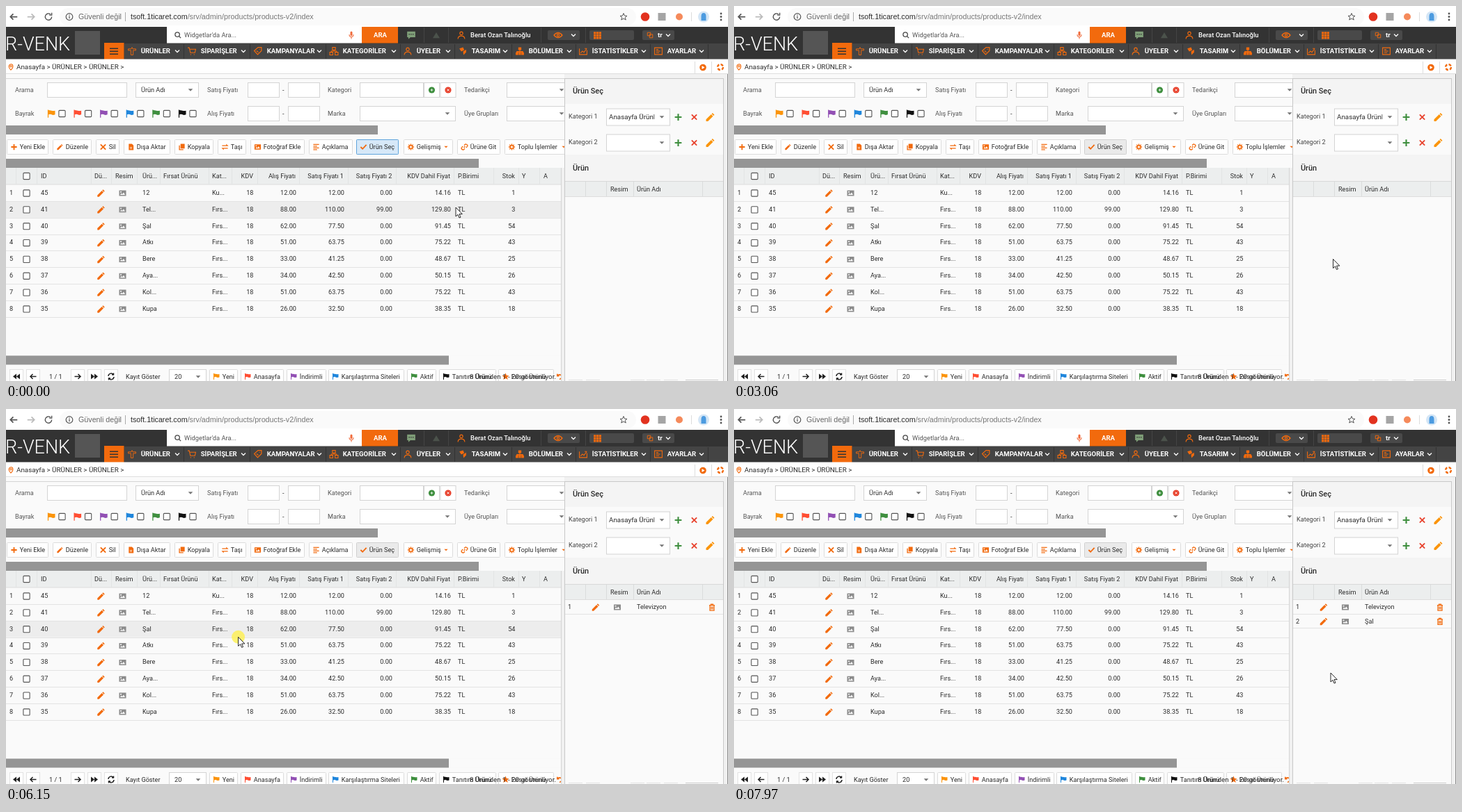
An HTML page for the animation above (8000 ms loop, 1037 by 540 pixels).

```html
<!DOCTYPE html>
<html lang="tr">
<head>
<meta charset="utf-8">
<title>Ürün Seç</title>
<style>
html, body { margin: 0; width: 100%; height: 100%; overflow: hidden; background: #fafafa; }
svg { display: block; width: 1037px; height: 540px; }
text { font-family: Roboto, "Noto Sans", sans-serif; white-space: pre; }
text.url { font-family: "Liberation Sans", Arial, sans-serif; }
</style>
</head>
<body>
<svg id="stage" viewBox="0 0 1037 540"></svg>
<script>
const stage = document.getElementById('stage');
const ORANGE = '#f26a0d', GREEN = '#3f8f3f', RED = '#e8432e', INK = '#2b2b2b', LINE = '#d4d4d4';
const PURPLE = '#9250b4', BLUE = '#1f86dc', AMBER = '#fb940b';
let layer = stage;

function el(tag, attrs, parent = layer) {
  const node = document.createElementNS('http://www.w3.org/2000/svg', tag);
  for (const key in attrs) node.setAttribute(key, attrs[key]);
  return parent.appendChild(node);
}
const rect = (x, y, w, h, fill, more) => el('rect', { x, y, width: w, height: h, fill, ...more });
const box = (x, y, w, h, fill = '#fff', stroke = LINE, rx = 0) =>
  rect(x + .5, y + .5, w - 1, h - 1, fill, { stroke, rx });
const disc = (cx, cy, r, fill, more) => el('circle', { cx, cy, r, fill, ...more });

// Text is placed by the vertical centre of its capitals.
function text(x, cy, str, more = {}) {
  const size = more['font-size'] || 9.13;
  const node = el('text', { x, y: cy + size * .355, fill: INK, 'font-size': size, ...more });
  node.textContent = str;
  return node;
}
const right = (x, cy, str) => text(x, cy, str, { 'text-anchor': 'end' });

// Icons on a 24 unit grid: [path, stroke width], 0 means filled.
const ICONS = {
  pencil: ['M3 17V21H7L18 10L14 6ZM15 5L19 9L21 7L17 3Z', 0],
  picture: ['M2 4H22V20H2ZM5 17H19L15 10L11 15L8 12ZM5 7V10H9V7Z', 0],
  flag: ['M3 3V21H5V14Q9 12 12 14T20 14V5Q16 6 12 5T5 4V3Z', 0],
  check: ['M3 12L9 18L21 5', 4],
  plus: ['M12 3V21M3 12H21', 4],
  cross: ['M4 4L20 20M20 4L4 20', 4],
  sheet: ['M5 2H15L20 7V22H5ZM9 11L15 18H12L9 14ZM15 11L9 18H12L15 14Z', 0],
  copy: ['M8 2H21V17H8ZM3 7H6V19H17V22H3Z', 0],
  swap: ['M3 8H20L16 4M21 16H4L8 20', 2.6],
  lines: ['M3 4H21M3 9.5H15M3 15H21M3 20.5H15', 2.6],
  gear: ['M12 2V6M12 18V22M2 12H6M18 12H22M5 5L8 8M16 16L19 19M5 19L8 16M16 8L19 5M7 12A5 5 0 1 0 17 12A5 5 0 1 0 7 12', 3.2],
  link: ['M10 14L14 10M11 7L15 3Q19 3 21 6T20 11L17 14M13 17L9 21Q5 21 3 18T4 13L7 10', 3],
  down: ['M4 8H20L12 16Z', 0],
  chevron: ['M4 8L12 16L20 8', 3.4],
  left: ['M21 12H4M11 5L4 12L11 19', 3],
  rightArrow: ['M3 12H20M13 5L20 12L13 19', 3],
  first: ['M12 4V20L2 12ZM22 4V20L12 12Z', 0],
  last: ['M12 4V20L22 12ZM2 4V20L12 12Z', 0],
  reload: ['M20 12A8 8 0 1 1 17 5.8M20 2V8H14', 2.4],
  sync: ['M4 11A8 8 0 0 1 18 6M20 13A8 8 0 0 1 6 18M19 2V7H14M5 22V17H10', 3],
  undo: ['M5 4V10H11M5 10Q12 3 18 9T12 21', 3.5],
  star: ['M12 2L15 9L22 9.5L16.5 14L18.5 21L12 17L5.5 21L7.5 14L2 9.5L9 9Z', 0],
  person: ['M8 7A4 4 0 1 0 16 7A4 4 0 1 0 8 7M3 22Q3 14 12 14T21 22', 2],
  pin: ['M12 22Q4 13 5 8T12 2T19 8T12 22ZM9 9A3 3 0 1 0 15 9A3 3 0 1 0 9 9', 2.5],
  trash: ['M4 6H20M9 5V3H15V5M6 7V21H18V7M10 10V18M14 10V18', 2.6],
  search: ['M15 15L21 21M3 10A7 7 0 1 0 17 10A7 7 0 1 0 3 10', 2.8],
  mic: ['M9 4Q9 1 12 1T15 4V11Q15 14 12 14T9 11ZM5 10Q5 18 12 18T19 10H17Q17 16 12 16T7 10ZM11 18H13V23H11Z', 0],
  chat: ['M2 3H22V17H10L5 22V17H2Z', 0],
  warn: ['M12 3L23 21H1Z', 0],
  eye: ['M1 12Q12 -1 23 12Q12 25 1 12ZM9 12A3 3 0 1 0 15 12A3 3 0 1 0 9 12', 2.4],
  grid: ['M2 3H8V9H2ZM9 3H15V9H9ZM16 3H22V9H16ZM2 10H8V15H2ZM9 10H15V15H9ZM16 10H22V15H16ZM2 16H8V22H2ZM9 16H15V22H9ZM16 16H22V22H16Z', 0],
  lang: ['M2 2H14V14H2ZM10 9H22V22H10Z', 2.5],
  box: ['M12 2L14 6H22V10H15V22H9V10H2V6H10Z', 1.7],
  cart: ['M1 3H5L8 16H20L22 7H6M9 20V22M18 20V22', 2],
  tag: ['M2 11L12 2H21V11L11 21ZM16 6V8M8 11L13 15', 2.2],
  tree: ['M8 2H16V9H8ZM1 15H9V22H1ZM15 15H23V22H15ZM12 9V12M5 15V12H19V15', 2],
  brush: ['M3 5L13 2L16 9L8 13ZM13 13L21 8V15L14 22Z', 0],
  blocks: ['M8 2H16V9H8ZM1 15H8V22H1ZM9 15H15V22H9ZM16 15H23V22H16ZM11 9H13V12H21V15H3V12H11Z', 0],
  chart: ['M2 5V21H22V9M5 17L10 12L14 15L21 6M16 5H22', 2],
  list: ['M2 3H22V21H2ZM6 8H12M6 12H17M6 16H14', 2]
};
function icon(name, cx, cy, size, color) {
  const [d, width] = ICONS[name], k = size / 24;
  return el('path', {
    d, transform: `translate(${cx - size / 2} ${cy - size / 2}) scale(${k})`,
    fill: width ? 'none' : color, 'fill-rule': 'evenodd',
    stroke: width ? color : 'none', 'stroke-width': width
  });
}
const checkbox = (cx, cy) => rect(cx - 4.6, cy - 4.6, 9.2, 9.2, '#fff', { stroke: '#555', 'stroke-width': 1.1, rx: 1 });
function select(x, y, w, h, label) {
  box(x, y, w, h);
  if (label) text(x + 8, y + h / 2, label);
  icon('down', x + w - 12, y + h / 2, 10, '#777');
}
const group = () => layer = el('g', {}, stage);

function browserBar() {
  rect(0, 0, 1037, 30, '#fff');
  rect(77, 3, 828, 25, '#fafafa', { rx: 12.5 });
  icon('left', 11, 15.5, 14, '#555');
  icon('rightArrow', 36, 15.5, 14, '#bbb');
  icon('reload', 61, 15.5, 14, '#555');
  disc(91, 15.5, 4.8, 'none', { stroke: '#555', 'stroke-width': 1.2 });
  rect(90.4, 14.5, 1.2, 3.6, '#555');
  rect(90.4, 12.4, 1.2, 1.2, '#555');
  const url = { class: 'url', 'font-size': 10.73 };
  text(104, 15.5, 'Güvenli değil', { ...url, fill: '#666' });
  rect(171, 9, 1, 13, '#aaa');
  const address = text(179, 15.5, 'tsoft.1ticaret.com', url);
  el('tspan', { fill: '#777' }, address).textContent = '/srv/admin/products/products-v2/index';
  el('path', { d: ICONS.star[0], transform: 'translate(881 9.5) scale(.5)', fill: 'none', stroke: '#555', 'stroke-width': 2 });
  disc(918, 15.5, 6.3, '#e2321f');
  rect(936.5, 10, 11, 11, '#a5a5a5');
  disc(967, 15.5, 5, '#f58a5b');
  rect(984, 9, 1, 13, '#ddd');
  disc(1002, 15.5, 8, '#d4e6f6');
  el('path', { d: 'M998.5 21V15Q998.5 10 1002 10T1005.5 15V21Z', fill: '#4c9be0' });
  for (const y of [11, 15.5, 20]) disc(1027, y, 1.4, '#555');
}

function topBar() {
  rect(0, 30, 1037, 47, '#333');
  rect(170, 54, 867, 22.5, '#444');
  text(-1, 54, 'R-VENK', { 'font-size': 27, 'font-weight': 300, fill: '#fff' });
  rect(99, 36, 36, 34, '#555');
  rect(141, 53, 28.5, 24, ORANGE);
  for (const y of [61, 65, 69]) rect(149, y - .5, 12, 1.5, '#333');
  rect(231, 30, 280, 23.5, '#fff');
  icon('search', 247, 42, 11, '#444');
  text(256, 42, "Widgetlar'da Ara...", { 'font-size': 9.3, fill: '#555' });
  icon('mic', 496, 42, 12, '#f06a3a');
  rect(511, 30, 52, 23.5, ORANGE);
  const bold = { 'font-size': 9.6, 'font-weight': 700, fill: '#fff' };
  text(528, 42, 'ARA', bold);
  for (const x of [600, 635, 768, 832]) rect(x, 31, 1, 22, '#444');
  icon('chat', 582, 42, 14, '#7f9f78');
  for (const x of [578.5, 581.2, 584]) rect(x, 40, 1.4, 1.4, '#333');
  icon('warn', 618, 42, 11, '#4b524b');
  icon('person', 654, 42, 13, ORANGE);
  text(667, 42, 'Berat Ozan Talınoğlu', { 'font-size': 9.4, 'font-weight': 500, fill: '#fff' });
  for (const [x, w, name, cx] of [[778, 46, 'eye', 793], [838, 64, 'grid', 849.5], [914, 46, 'lang', 925]]) {
    rect(x, 35, w, 14, '#494949', { rx: 2 });
    icon(name, cx, 42, name === 'lang' ? 9 : 13, ORANGE);
  }
  text(936, 42, 'tr', bold);
  for (const x of [815, 951]) icon('chevron', x, 42, 9, '#fff');

  const menu = [
    [181, 'ÜRÜNLER', 246, 'box'], [267, 'SİPARİŞLER', 341, 'cart'], [362, 'KAMPANYALAR', 450, 'tag'],
    [471, 'KATEGORİLER', 557, 'tree'], [577, 'ÜYELER', 635, 'person'], [656, 'TASARIM', 717, 'brush'],
    [738, 'BÖLÜMLER', 809, 'blocks'], [829, 'İSTATİSTİKLER', 916, 'chart'], [937, 'AYARLAR', 999, 'list']
  ];
  for (const [x, label, end, name] of menu) {
    icon(name, x, 65, 13, ORANGE);
    text(x + 12.7, 65, label, bold);
    icon('chevron', end, 65, 9, '#fff');
    rect(end + 9, 55, 1, 21, '#333');
  }
}

function breadcrumb() {
  rect(0, 76.5, 1037, 22, '#fff');
  rect(0, 97, 1037, 1, '#ddd');
  icon('pin', 7, 88, 10, ORANGE);
  text(15, 87.5, 'Anasayfa > ÜRÜNLER > ÜRÜNLER >', { 'font-size': 9.85 });
  rect(989, 80, 1, 17, '#ddd');
  rect(1013, 80, 1, 17, '#ddd');
  disc(1001, 88.5, 4.8, ORANGE);
  el('path', { d: 'M999.5 86V91L1003.5 88.5Z', fill: '#fff' });
  disc(1026, 88, 4, 'none', { stroke: ORANGE, 'stroke-width': 2.4, 'stroke-dasharray': '4 2.3' });
}

function filters() {
  rect(0, 104, 802, 1, LINE);
  const grey = { fill: '#555' };
  const labels = [[13, 'Arama', 'Bayrak'], [289, 'Satış Fiyatı', 'Alış Fiyatı'], [462, 'Kategori', 'Marka'], [658, 'Tedarikçi', 'Üye Grupları']];
  for (const [x, a, b] of labels) {
    text(x, 121, a, grey);
    text(x, 154.5, b, grey);
  }
  box(59, 110, 115, 22);
  select(186, 110, 91, 22, 'Ürün Adı');
  for (const y of [110, 144]) {
    box(347, y, 46, 22);
    text(397, y + 11, '-');
    box(405, y, 46, 22);
    select(719, y, 91, 22);
  }
  box(508, 110, 92, 22);
  for (const [x, color, name] of [[600, GREEN, 'plus'], [623.5, RED, 'cross']]) {
    box(x, 110, 23, 22);
    disc(x + 11.5, 121, 4.6, color);
    icon(name, x + 11.5, 121, 5, '#fff');
  }
  select(508, 144, 138, 22);
  [AMBER, '#ff4e33', PURPLE, BLUE, GREEN, '#111'].forEach((color, i) => {
    icon('flag', 65.5 + i * 37.6, 155, 15, color);
    checkbox(80.5 + i * 37.6, 155);
  });
}

function scrollbar(y, w) {
  rect(0, y, 802, 13, '#fafafa');
  rect(0, y, w, 13, '#959595');
}

let focusRing;
function toolbar() {
  const buttons = [
    [1, 60, 'Yeni Ekle', 'plus'], [67, 56, 'Düzenle', 'pencil'], [129, 34, 'Sil', 'cross'], [169, 67, 'Dışa Aktar', 'sheet'],
    [242, 56, 'Kopyala', 'copy'], [304, 41, 'Taşı', 'swap'], [351, 78, 'Fotoğraf Ekle', 'picture'], [435, 63, 'Açıklama', 'lines'],
    [503, 61, 'Ürün Seç', 'check'], [571, 71, 'Gelişmiş', 'gear'], [648, 62, 'Ürüne Git', 'link'], [716, 92, 'Toplu İşlemler', 'gear']
  ];
  for (const [x, w, label, name] of buttons) {
    const active = name === 'check';
    box(x, 192, w, 22, active ? '#eaeaea' : '#fff', active ? '#d0d0d0' : '#dcdcdc', 1);
    if (active) focusRing = box(x, 192, w, 22, '#d6e8f8', '#5fa4dc', 1);
    icon(name, x + 10.5, 203, 11, ORANGE);
    text(x + 18.7, 203, label);
  }
  icon('down', 632, 203, 8, ORANGE);
  icon('down', 801, 203, 8, ORANGE);
}

const ROW_TOP = 257, ROW_H = 23.85;
let hoverBar;
function productGrid() {
  rect(0, 233, 797, 24, '#eceeee');
  rect(0, 256.5, 797, 1, '#ddd');
  for (const x of [14, 44, 122, 151, 188, 221, 291, 324, 361, 421, 491, 560, 643, 700, 736, 766]) rect(x, 233, 1, 24, '#e2e4e4');
  checkbox(29.5, 245);
  for (const [x, s] of [[50, 'ID'], [127, 'Dü...'], [157, 'Resim'], [196, 'Ürü...'], [226, 'Fırsat Ürünü'], [296, 'Kat...'], [649, 'P.Birimi'], [741, 'Y'], [772, 'A']])
    text(x, 245, s);
  for (const [x, s] of [[355, 'KDV'], [416, 'Alış Fiyatı'], [485, 'Satış Fiyatı 1'], [554.5, 'Satış Fiyatı 2'], [638, 'KDV Dahil Fiyat'], [731, 'Stok']])
    right(x, 245, s);

  hoverBar = rect(0, ROW_TOP, 797, ROW_H, '#ededed');
  const rows = [
    ['45', '12', '12.00', '12.00', '0.00', '14.16', '1'],
    ['41', 'Tel...', '88.00', '110.00', '99.00', '129.80', '3'],
    ['40', 'Şal', '62.00', '77.50', '0.00', '91.45', '54'],
    ['39', 'Atkı', '51.00', '63.75', '0.00', '75.22', '43'],
    ['38', 'Bere', '33.00', '41.25', '0.00', '48.67', '25'],
    ['37', 'Aya...', '34.00', '42.50', '0.00', '50.15', '26'],
    ['36', 'Kol...', '51.00', '63.75', '0.00', '75.22', '43'],
    ['35', 'Kupa', '26.00', '32.50', '0.00', '38.35', '18']
  ];
  rows.forEach(([id, name, ...values], i) => {
    const y = ROW_TOP + ROW_H * i + 11.7;
    rect(0, Math.round(ROW_TOP + ROW_H * (i + 1)), 797, 1, '#e3e3e3');
    text(5, y, i + 1);
    checkbox(29.5, y + .8);
    text(50, y, id);
    icon('pencil', 136.5, y + .8, 14, ORANGE);
    icon('picture', 167.5, y + .8, 12, '#8b8b8b');
    text(196, y, name);
    text(296, y, i ? 'Fırs...' : 'Ku...');
    right(355.5, y, '18');
    [417, 486, 555, 639, 731.5].forEach((x, k) => right(x, y, values[k]));
    text(649, y, 'TL');
  });
}

function footer() {
  rect(0, 517, 802, 23, '#fafafa');
  const pager = [[15, 'first'], [39, 'left'], [103, 'rightArrow'], [127, 'last'], [151, 'sync']];
  for (const [x, name] of pager) {
    box(x - 10, 523, 20, 22, '#fff', '#e2e2e2');
    icon(name, x, 533.5, 12, '#222');
  }
  text(62, 533.5, '1 / 1');
  text(172, 533.5, 'Kayıt Göster');
  select(234, 523, 54, 22, '20');
  const marks = [
    [292, 41, 'Yeni', AMBER], [337, 62, 'Anasayfa', '#ff4e33'], [403, 57, 'İndirimli', PURPLE],
    [463, 109, 'Karşılaştırma Siteleri', BLUE], [576, 42, 'Aktif', GREEN], [622, 82, 'Tanıtım Ürünü', '#111'], [707, 80, 'Fırsat Ürünü', ORANGE]
  ];
  for (const [x, w, label, color] of marks) {
    box(x, 523, w, 22, '#fff', '#dcdcdc', 1);
    icon(x === 707 ? 'star' : 'flag', x + 10.5, 533.5, 12, color);
    text(x + 18.8, 533.5, label);
  }
  text(790, 533.5, '8 Üründen 1 - 20 gösteriliyor.', { 'font-size': 9.8, 'text-anchor': 'end' });
  icon('undo', 795, 533.5, 11, ORANGE);
}

const picked = [];
function sidePanel() {
  rect(797, 233, 240, 307, '#f1f1f1');
  rect(802, 98, 235, 135, '#f1f1f1');
  rect(797, 233, 1, 307, LINE);
  box(802, 104, 229, 440, '#fafafa', '#c8c8c8');
  rect(803, 105, 227, 36, '#f4f4f4');
  rect(803, 214, 227, 38, '#f4f4f4');
  const title = { 'font-size': 10.9, 'font-weight': 500 };
  text(814, 122, 'Ürün Seç', title);
  text(814, 233, 'Ürün', title);
  [159.5, 196.5].forEach((y, i) => {
    text(808, y - .5, 'Kategori ' + (i + 1), { fill: '#444' });
    select(862, y - 12, 92, 25);
    icon('plus', 965.5, y + .5, 13, GREEN);
    icon('cross', 988.5, y + .5, 11, RED);
    icon('pencil', 1011.5, y + .5, 16, AMBER);
  });
  const clip = el('clipPath', { id: 'field' });
  el('rect', { x: 862, y: 148, width: 69.5, height: 24 }, clip);
  text(866, 160, 'Anasayfa Ürünleri', { 'font-size': 9.8, 'clip-path': 'url(#field)' });
  rect(803, 252, 227, 22.5, '#eceeee');
  rect(803, 252, 227, 1, '#d8d8d8');
  rect(803, 274, 227, 1, '#ddd');
  for (const x of [832, 862, 901, 1000]) rect(x, 253, 1, 21, '#dadcdc');
  text(868, 264, 'Resim');
  text(906, 264, 'Ürün Adı');
  for (const x of [808, 833, 897, 920, 945]) rect(x, 538, 20, 1, '#e2e2e2');
  rect(976, 538, 47, 1, '#ccc');
  rect(1036, 98, 1, 442, '#8d8d8d');

  const panel = layer;
  ['Televizyon', 'Şal'].forEach((name, i) => {
    const y = 285 + i * 20.3;
    picked.push(layer = el('g', {}, panel));
    text(807, y, i + 1);
    icon('pencil', 847, y + .6, 14, ORANGE);
    icon('picture', 878, y + .6, 12, '#8b8b8b');
    text(906, y, name);
    icon('trash', 1014, y + .6, 12, ORANGE);
    rect(803, Math.round(y + 10), 227, 1, '#e3e3e3');
  });
}

group(); browserBar(); topBar(); breadcrumb(); filters();
scrollbar(172, 534); toolbar(); scrollbar(220, 679); productGrid(); scrollbar(503.5, 636); footer();
group(); sidePanel();

const mask = group();
rect(802, 252.5, 229, 288, '#000', { opacity: .66 });
rect(871, 332, 91, 153, '#000', { opacity: .07 });
text(916, 475, 'Loading...', { 'font-size': 10, 'font-weight': 700, 'text-anchor': 'middle', fill: '#7c7c7c' });
const spinner = el('g', {});
for (let i = 0; i < 12; i++)
  el('rect', { x: -.6, y: -6, width: 1.2, height: 3, fill: '#ddd', opacity: .15 + i * .07, transform: `rotate(${i * 30})` }, spinner);

const proxy = group();
box(0, 0, 216, 26, '#fff', '#cfcfcf');
icon('check', 16.5, 12.5, 11, ORANGE);
const halo = group();
disc(0, 0, 9.5, '#fff04a', { opacity: .78 });
const pointer = group();
el('path', { d: 'M0 0V13L3 10.3L5 15L7 14.2L5 9.6H9.3Z', fill: '#fff', stroke: '#111', 'stroke-width': .9, 'stroke-linejoin': 'round' });

// Tracks: [ms, x, y]
const cursorTrack = [
  [490, 646, 290], [600, 600, 296], [800, 400, 309], [1000, 260, 300], [1100, 238, 293],
  [1260, 238, 293], [1400, 250, 295], [1500, 290, 300], [1580, 387, 312], [2050, 765, 358], [2170, 830, 362], [2370, 860.5, 364.5],
  [5060, 861, 365], [5120, 800, 358], [5340, 370, 322], [5420, 274, 316], [5560, 238, 317], [5860, 232, 320],
  [5900, 232, 320], [6040, 250, 321], [6120, 300, 325], [6600, 820, 377], [6680, 867, 380], [6770, 871.5, 379.5],
  [7969, 871.5, 379.5], [7970, 857, 380]
];
const proxyTrack = [
  [1590, 248, 308], [1640, 390, 322], [2050, 733, 374], [2170, 818, 375], [2370, 870, 380],
  [6160, 242, 335], [6220, 350, 345], [6600, 800, 390], [6680, 861, 393], [6770, 882, 395]
];
function at(track, t) {
  const i = track.findIndex(k => k[0] > t);
  if (i === 0) return track[0].slice(1);
  if (i < 0) return track[track.length - 1].slice(1);
  const [t0, x0, y0] = track[i - 1], [t1, x1, y1] = track[i], f = (t - t0) / (t1 - t0);
  return [x0 + (x1 - x0) * f, y0 + (y1 - y0) * f];
}
// The pointer and the drag box rest between 2370 and their next move.
const held = (t, next) => t > 2370 && t < next ? 2370 : t;
const within = (t, ...spans) => spans.some(([a, b]) => t >= a && t < b);
const show = (node, on) => node.setAttribute('visibility', on ? 'visible' : 'hidden');
const move = (node, [x, y]) => node.setAttribute('transform', `translate(${x} ${y})`);

function draw(t) {
  const tip = at(cursorTrack, held(t, 5060));
  move(pointer, tip);
  move(halo, tip);
  show(halo, within(t, [1260, 2830], [5900, 7020]));
  move(proxy, at(proxyTrack, held(t, 6160)).map(Math.round));
  show(proxy, within(t, [1540, 3060], [6160, 7280]));

  // The row highlight trails the pointer a little.
  const [hx, hy] = at(cursorTrack, t - 50);
  const row = Math.floor((hy - ROW_TOP) / ROW_H);
  show(hoverBar, hx < 797 && row >= 0 && row < 8);
  hoverBar.setAttribute('y', ROW_TOP + ROW_H * row);

  show(focusRing, t < 1260);
  show(mask, within(t, [4100, 4380], [7280, 7560]));
  spinner.setAttribute('transform', `translate(915 400) rotate(${Math.floor(t / 47) * 30 % 360})`);
  show(picked[0], t >= 4380);
  show(picked[1], t >= 7560);
}

const start = performance.now();
function tick() {
  draw((performance.now() - start) % 8000);
  requestAnimationFrame(tick);
}
tick();
</script>
</body>
</html>
```
